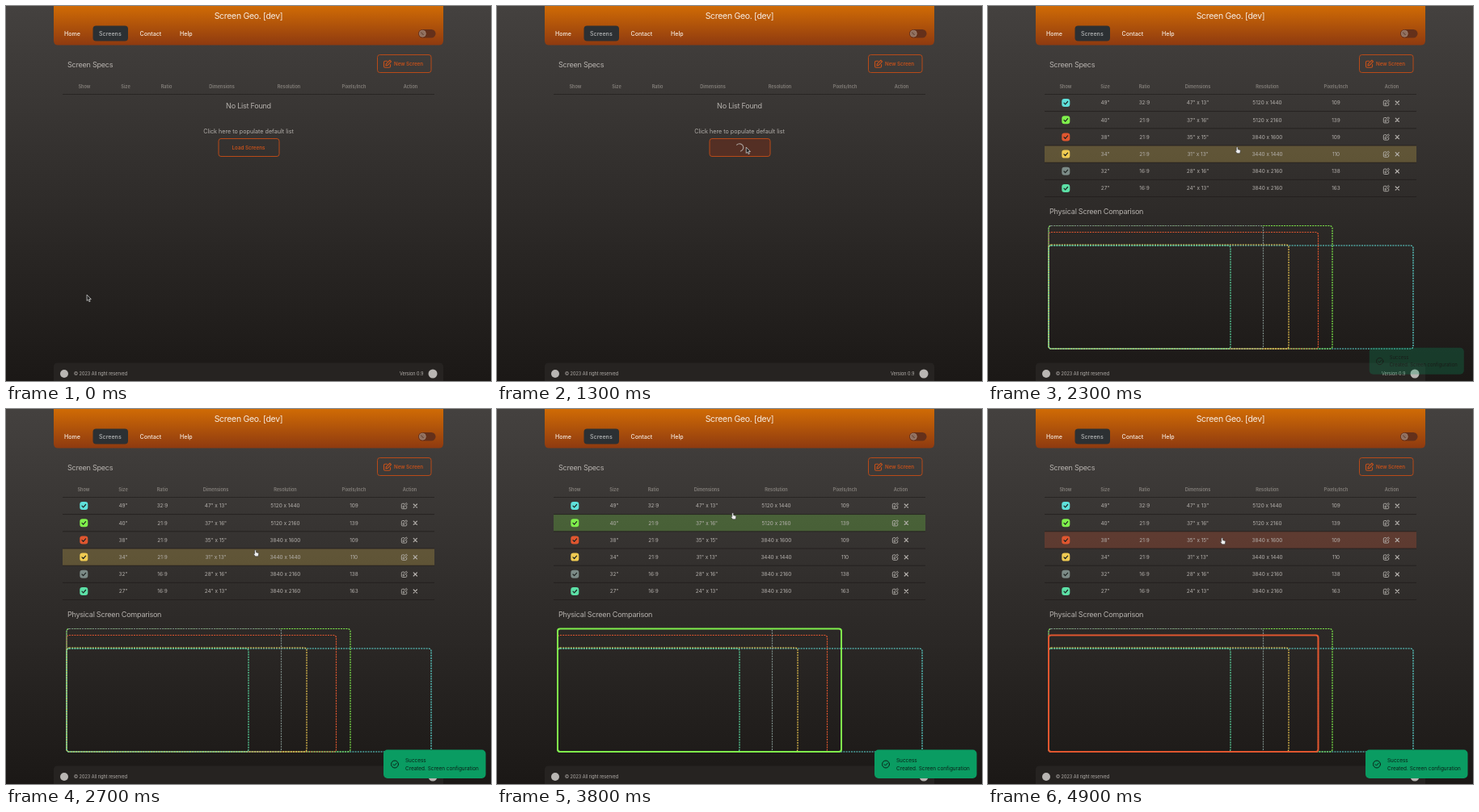
An HTML page that plays this animation: 600 px wide and 465 px high, repeating every 5000 ms.

```html
<!DOCTYPE html>
<html lang="en">
<head>
<meta charset="utf-8">
<title>Screen list</title>
<style>
  html, body { margin: 0; width: 600px; height: 465px; overflow: hidden; background: #1c1917; }
  svg { display: block; font: 6.4px Inter, "Open Sans", sans-serif; fill: #b5b1ad; }
  .title { font-size: 10.5px; letter-spacing: -.03em; fill: #f6ece2; }
  .h2 { font-size: 9.1px; letter-spacing: -.03em; }
  .nav { font-size: 7.1px; font-weight: 500; fill: #f6ece2; }
  .head { font-size: 5.6px; font-weight: 600; fill: #85807c; }
  .btn { font-size: 6.2px; font-weight: 600; fill: #c4511b; }
  .foot { font-size: 5.5px; }
  .mid { text-anchor: middle; }
  .line { fill: none; stroke-linecap: round; stroke-linejoin: round; }
</style>
</head>
<body>
<svg width="600" height="465" viewBox="0 0 600 465">
  <defs>
    <linearGradient id="page" x2="0" y2="1">
      <stop stop-color="#44413f"/><stop offset="1" stop-color="#1b1816"/>
    </linearGradient>
    <linearGradient id="bar" x2="0" y2="1">
      <stop stop-color="#d06b05"/><stop offset="1" stop-color="#8e3a10"/>
    </linearGradient>
    <g id="edit" class="line">
      <path d="M0-3H-2Q-3.2-3-3.2-1.8V2.2Q-3.2 3.4-2 3.4H2Q3.2 3.4 3.2 2.2V.4M-1.3 1.5L-.9-.3 2.7-3.8 4-2.5 .5 1.1Z"/>
    </g>
  </defs>

  <rect width="600" height="465" fill="url(#page)"/>
  <path d="M59 0H541V43Q541 48.500 535.500 48.500H64.500Q59 48.500 59 43Z" fill="url(#bar)"/>
  <text class="title mid" x="300" y="15.600">Screen Geo. [dev]</text>
  <rect x="107.500" y="24.500" width="43.500" height="19" rx="4" fill="#2c3033"/>
  <g class="nav">
    <text x="72" y="36.600">Home</text>
    <text x="115" y="36.600" fill="#b3b5b6" style="fill:#b3b5b6">Screens</text>
    <text x="165.500" y="36.600">Contact</text>
    <text x="215" y="36.600">Help</text>
  </g>
  <rect x="510" y="29" width="21.500" height="10.500" rx="5.250" fill="#64301a"/>
  <circle cx="515.300" cy="34.200" r="4" fill="#8f6f5f" stroke="#a98c7c" stroke-width=".7"/>
  <path d="M513.300 32.500L516.500 36" stroke="#5d3c2c"/>

  <text class="h2" x="76" y="76">Screen Specs</text>
  <rect x="459.500" y="60.500" width="66.500" height="22" rx="3" fill="none" stroke="#b84a18"/>
  <use href="#edit" transform="translate(471.500 72) scale(1.250)" stroke="#c4511b" stroke-width=".9"/>
  <text class="btn" x="480" y="74.200">New Screen</text>
  <path d="M70 109.500H530" stroke="#24211f" stroke-width=".8"/>
  <g id="heads" class="head mid"></g>

  <g id="empty" class="mid">
    <text class="h2" x="300" y="127.300">No List Found</text>
    <text x="300" y="157.700" style="font-size:7.200px">Click here to populate default list</text>
    <rect id="load" x="263" y="164.500" width="75" height="22" rx="3" stroke="#b84a18"/>
    <text id="loadText" class="btn" x="300" y="177.800">Load Screens</text>
    <path id="spin" class="line" d="M-3.300-3.300A4.700 4.700 0 1 1 1.500 4.450" stroke="#aaa09b" stroke-width="1.200"/>
  </g>

  <g id="list">
    <rect id="hover" x="70" width="460" height="21.200" opacity=".23"/>
    <g id="rows" class="mid"></g>
    <text class="h2" x="76" y="257.700">Physical Screen Comparison</text>
    <g id="boxes" class="line" stroke-width="1.200" style="stroke-linecap:butt" stroke-dasharray="2 1.200"></g>
    <rect id="focus" x="75" rx="3" fill="none" stroke-width="2"/>
  </g>

  <path d="M59 465V447.500Q59 442.500 64 442.500H536Q541 442.500 541 447.500V465Z" fill="#262321"/>
  <circle cx="72" cy="456" r="5" fill="#b9b6b3"/>
  <text class="foot" x="84" y="458">© 2023 All right reserved</text>
  <text class="foot" x="487" y="458">Version 0.9</text>
  <circle cx="528" cy="456" r="5.500" fill="#b9b6b3"/>

  <g id="toast" fill="#0b2118">
    <rect x="467" y="422.500" width="126.500" height="35.500" rx="5" fill="#0a9c62"/>
    <g class="line" stroke="#0b2118">
      <circle cx="481" cy="440.500" r="4.500"/><path d="M479 440.600L480.500 442.100 483.200 439.200"/>
    </g>
    <text x="494" y="438.300">Success</text>
    <text x="494" y="447.700">Created. Screen configuration</text>
  </g>

  <path id="arrow" d="M0 0V7.500L1.700 6 2.900 8.700 4.200 8.100 3 5.500H5.300Z" fill="#222" stroke="#ddd" stroke-width=".7"/>
  <path id="hand" d="M-.8 0Q.3-.6 .6 .6V2.700L3.300 3.400Q4 3.700 3.800 4.700L3.200 7.800H-.4L-2.500 5Q-2.600 3.900-1.300 4.500V.6Q-1.300 .1-.8 0Z" fill="#eee" stroke="#333" stroke-width=".6"/>
</svg>
<script>
const LOOP = 5000, STEP = 100, CLICK = 1000, LOADED = 2200;
const $ = id => document.getElementById(id);
const set = (el, attrs) => { for (const k in attrs) el.setAttribute(k, attrs[k]); };
const show = (el, on) => { el.style.display = on ? '' : 'none'; };
const clamp = x => Math.max(0, Math.min(1, x));

// size, ratio, dimensions, resolution, density, colour, box right and top
const screens = [
  ['49"', '32:9', '47" x 13"', '5120 x 1440', 109, '#5fe0da', 526, 297],
  ['40"', '21:9', '37" x 16"', '5120 x 2160', 139, '#80f04c', 426, 272.5],
  ['38"', '21:9', '35" x 15"', '3840 x 1600', 109, '#e0562f', 408.5, 280.5],
  ['34"', '21:9', '31" x 13"', '3440 x 1440', 110, '#f0cb52', 372, 296],
  ['32"', '16:9', '28" x 16"', '3840 x 2160', 138, '#7c8b87', 340.5, 272.5],
  ['27"', '16:9', '24" x 13"', '3840 x 2160', 163, '#5ce0a6', 300, 297]
];
const labels = ['Show', 'Size', 'Ratio', 'Dimensions', 'Resolution', 'Pixels/Inch', 'Action'];
const emptyCols = [97, 148, 198.5, 267, 350, 430.5, 500.5];
const listCols = [96, 145, 193.5, 259.5, 345.5, 430.5, 499.5];
const FLOOR = 425;
const rowY = i => 120 + 21.2 * i;

const text = (x, y, s) => `<text x="${x}" y="${y}">${s}</text>`;
const boxSize = ([, , , , , , right, top]) => ({ y: top, width: right - 75, height: FLOOR - top });

$('heads').innerHTML = labels.map(s => text(0, 102, s)).join('');
$('rows').innerHTML = screens.map((s, i) => {
  const y = rowY(i);
  return `<path d="M70 ${y + 10.6}H530" stroke="#211e1c" stroke-width=".8"/>
    <rect x="91.300" y="${y - 5}" width="10" height="10" rx="3.200" fill="${s[5]}"/>
    <path class="line" d="M94 ${y + .2}l1.600 1.700 3-3.400" stroke="#1e2422" stroke-width="1.200"/>
    ${s.slice(0, 5).map((v, c) => text(listCols[c + 1], y + 2.3, v)).join('')}
    <use href="#edit" x="492.500" y="${y + .3}" stroke="#b5b1ad" stroke-width=".9"/>
    <path class="line" d="M504.200 ${y - 2}l4.200 4.200m0-4.200l-4.200 4.200" stroke="#b5b1ad" stroke-width="1.200"/>`;
}).join('');
$('boxes').innerHTML = screens.map(s => {
  const b = boxSize(s);
  return `<rect x="75" y="${b.y}" width="${b.width}" height="${b.height}" rx="3" stroke="${s[5]}"/>`;
}).join('');

// time, pointer tip x, y
const path = [
  [0, 100, 358], [600, 308, 175], [2200, 308.5, 175], [3000, 309, 175], [3500, 306.5, 173],
  [3800, 292, 129], [4000, 292, 118], [4200, 292.5, 122], [4400, 292.5, 134],
  [4700, 291, 148], [4900, 290, 160], [5000, 290, 161]
];
// time, hovered row
const hovers = [[LOADED, 3], [3700, 2], [3800, 1], [3900, 0], [4300, 1], [4800, 2]];

function pointer(t) {
  const i = path.findIndex(p => p[0] > t);
  const [t0, x0, y0] = path[i - 1], [t1, x1, y1] = path[i];
  const p = (t - t0) / (t1 - t0), e = p * p * (3 - 2 * p);
  return [x0 + (x1 - x0) * e, y0 + (y1 - y0) * e];
}

function draw(t) {
  const loaded = t >= LOADED, loading = t >= CLICK && !loaded, over = t >= 600;
  const cols = loaded ? listCols : emptyCols;
  [...$('heads').children].forEach((el, i) => set(el, { x: cols[i] }));

  show($('empty'), !loaded);
  show($('list'), loaded);
  show($('loadText'), !loading);
  show($('spin'), loading);
  set($('load'), { fill: loading ? '#542f24' : over ? '#45302a' : 'none' });
  set($('spin'), { transform: `translate(300 175.500) rotate(${(t - 1300) * .8})` });

  if (loaded) {
    const row = hovers.filter(h => h[0] <= t).pop()[1], s = screens[row];
    set($('hover'), { y: rowY(row) - 10.6, fill: s[5] });
    set($('focus'), { ...boxSize(s), stroke: s[5] });
    show($('focus'), t >= 3700);
  }

  const p = clamp((t - 2250) / 200);
  set($('toast'), {
    opacity: p,
    transform: `translate(530.500 440.500) scale(${.9 + .1 * p}) translate(-530.500 -440.500)`
  });

  const hand = loaded || over && !loading;
  show($('hand'), hand);
  show($('arrow'), !hand);
  set($(hand ? 'hand' : 'arrow'), { transform: `translate(${pointer(t)})` });
}

const start = performance.now();
function tick() {
  const t = (performance.now() - start) % LOOP;
  draw(Math.floor(t / STEP) * STEP);
  requestAnimationFrame(tick);
}
tick();
</script>
</body>
</html>
```
